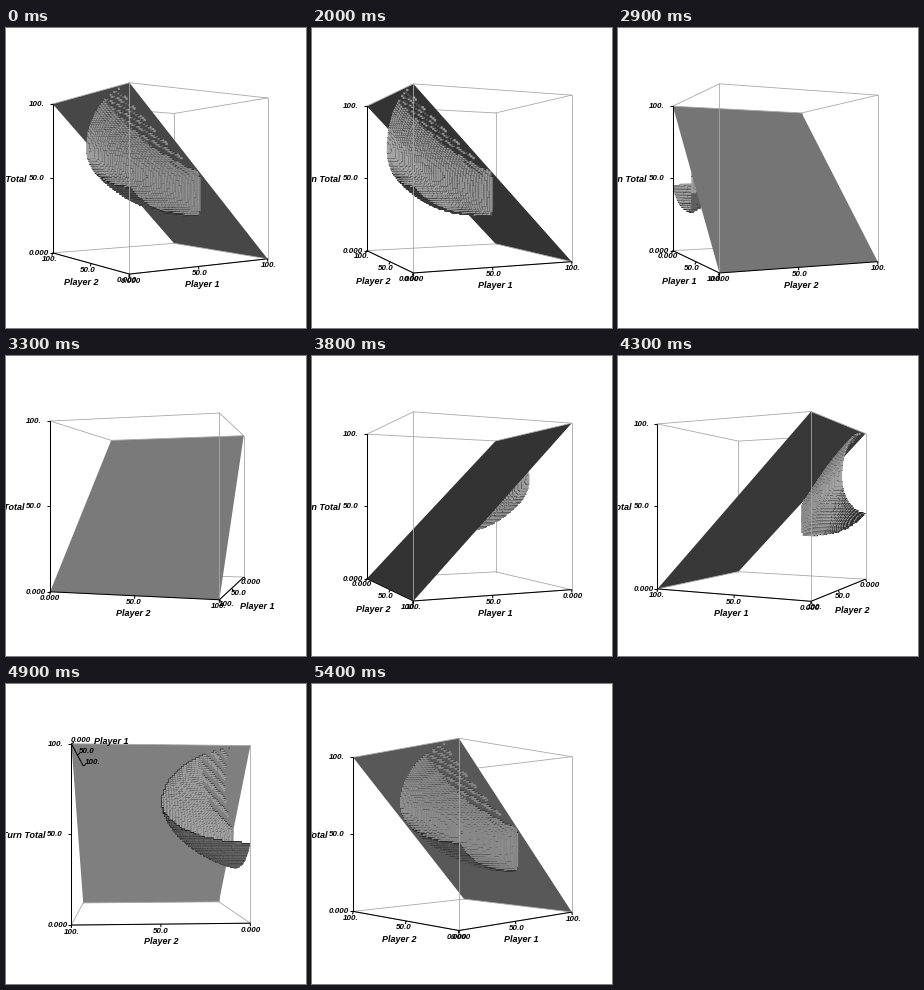
These frames come from a looping animation (300x300 px, 5.5 s). A matplotlib script:

```python
import itertools

import matplotlib.pyplot as plt
import numpy as np
from matplotlib.animation import FuncAnimation
from matplotlib.collections import LineCollection, PolyCollection

SIZE = 300
FOCAL, DIST = 560, 3.62
START, STEP = 56.3, 10          # camera heading in degrees
FRAMES, HOLD = 55, 20
NAMES = ("Player 1", "Player 2")
TICKS = ("0.000", "50.0", "100.")
FONT = dict(family="Liberation Sans", weight="bold", style="italic", va="center")


def project(pts, phi):
    """Perspective view of the unit box; returns screen points and depth."""
    q = np.asarray(pts, float) - 0.5
    c, s = np.cos(phi), np.sin(phi)
    depth = c * q[..., 0] + s * q[..., 1]
    scale = FOCAL / (DIST + depth)
    x = 150 + scale * (s * q[..., 0] - c * q[..., 1])
    y = 150.4 - scale * q[..., 2]
    return np.stack([x, y], -1), depth


def build_boundary():
    """Unit-cell faces of the hold region below the winning plane."""
    i, j, k = np.indices((50, 54, 100))
    x, y, z = i + 0.5, j + 0.5, k + 0.5
    reach = 50 * np.clip(1 - (x / 47) ** 1.6, 1e-6, 1)
    bend = np.sqrt(np.clip(1 - (y / reach) ** 2, 0, 1))
    tip = 68 - 0.6 * x
    low = 28 + 18 * np.exp(-x / 14)
    valid = i + k <= 98
    inside = (y < reach) & valid
    inside &= (z >= tip - (tip - low) * bend)
    inside &= (z <= tip + (100 - x - tip) * bend)

    quads, normals, lower = [], [], []
    for a in range(3):
        n = inside.shape[a]
        first, second = range(n - 1), range(1, n)
        here, there = inside.take(first, a), inside.take(second, a)
        edge = (here != there) & valid.take(first, a) & valid.take(second, a)
        cell = np.argwhere(edge)
        sign = np.where(here[edge], 1.0, -1.0)
        is_low = cell[:, 2] < 68 - 0.6 * cell[:, 0]

        # close to the plane only broken rows stay visible
        margin = 100 - cell[:, 0] - cell[:, 2]
        row = (cell[:, 0] + cell[:, 1]) % 5
        keep = is_low | (margin > 6) | (row < 2)
        cell, sign, is_low = cell[keep], sign[keep], is_low[keep]

        base = cell.astype(float)
        base[:, a] += 1
        u, v = np.delete(np.eye(3), a, 0)
        quads.append(np.stack([base, base + u, base + u + v, base + v], 1) / 100)
        normals.append(sign[:, None] * np.eye(3)[a])
        lower.append(is_low)
    return np.concatenate(quads), np.concatenate(normals), np.concatenate(lower)


QUADS, NORMALS, LOWER = build_boundary()
CENTERS = QUADS.mean(1)
PLANE = np.array([(0, 0, 1), (0, 1, 1), (1, 1, 0), (1, 0, 0)])
CORNERS = list(itertools.product((0, 1), repeat=3))
EDGES = [(p, q) for p, q in itertools.combinations(CORNERS, 2)
         if sum(abs(a - b) for a, b in zip(p, q)) == 1]

fig = plt.figure(figsize=(3, 3), dpi=100, facecolor="white")
ax = fig.add_axes([0, 0, 1, 1])
ax.set_xlim(0, SIZE)
ax.set_ylim(SIZE, 0)
ax.axis("off")

plane = plt.Polygon(np.zeros((4, 2)), closed=True, lw=0, zorder=3)
ax.add_patch(plane)
bowl = PolyCollection([], linewidths=0.3)
ax.add_collection(bowl)
box = [ax.plot([], [], color="#a8a8a8", lw=0.6)[0] for _ in EDGES]
rules = LineCollection([], colors="black", linewidths=0.75, zorder=6)
ax.add_collection(rules)


def make_text(size, ha="center"):
    return ax.text(0, 0, "", fontsize=size, ha=ha, zorder=7, **FONT)


marks = [[make_text(5.8, "left" if a == 2 else "center") for _ in TICKS]
         for a in range(3)]
titles = [make_text(6.5, "right" if a == 2 else "center") for a in range(3)]
titles[2].set_text("Turn Total")
for a in range(3):
    for mark, label in zip(marks[a], TICKS):
        mark.set_text(label)
for a in range(2):
    titles[a].set_text(NAMES[a])


def flip(corner, axis):
    return tuple(1 - c if a == axis else c for a, c in enumerate(corner))


def pick_axes(phi):
    """Outer edges for the three axes: (axis, corner, corner)."""
    pts, depth = project(CORNERS, phi)
    pos = dict(zip(CORNERS, pts))
    far = dict(zip(CORNERS, depth))
    floor = [c for c in CORNERS if c[2] == 0]
    left = min(floor, key=lambda c: pos[c][0] ** 2 + (SIZE - pos[c][1]) ** 2)

    def slope(axis):
        dx, dy = pos[flip(left, axis)] - pos[left]
        return -dy / dx if dx > 0 else np.inf

    main = min((0, 1), key=slope)
    other = 1 - main
    right = flip(left, main)
    top = flip(left, 2)
    start = right if far[flip(right, other)] < far[flip(left, other)] else top
    return pos, [(main, left, right), (other, start, flip(start, other)),
                 (2, left, top)]


def draw_axes(phi):
    pos, axes = pick_axes(phi)
    lines = []
    for axis, a, b in axes:
        d = pos[b] - pos[a]
        n = np.array([d[1], -d[0]]) / np.hypot(*d)
        if axis == 2:
            n = np.array([-1.0, 0.0])
        elif a[2] == 0 and n[1] < 0:
            n = -n
        p0, p1 = (pos[a], pos[b]) if a[axis] == 0 else (pos[b], pos[a])
        lines.append([p0, p1])
        for t, mark in zip((0, 0.5, 1), marks[axis]):
            p = p0 + t * (p1 - p0)
            lines.append([p, p + 3 * n])
            shift = (-24, 0.5) if axis == 2 else (11 * n[0], 7 * n[1])
            mark.set_position(p + shift)
        if axis == 2:
            shift = (-26, 0.8)
        else:
            shift = (38 * n[0], n[1] * (17 + 12 * abs(n[0])))
        titles[axis].set_position((p0 + p1) / 2 + shift)
    rules.set_segments(lines)


def draw_bowl(phi):
    cam = np.array([0.5 - DIST * np.cos(phi), 0.5 - DIST * np.sin(phi), 0.5])
    ray = cam - CENTERS
    dist = np.linalg.norm(ray, axis=1)
    facing = (NORMALS * ray).sum(1) / dist
    tone = 25 + 140 * np.abs(facing) ** 0.6
    shaded = LOWER & (facing > 0) & (NORMALS[:, 1] == 0)
    tone = np.where(shaded, 0.6 * tone, tone) / 255
    order = np.argsort(-dist)
    verts, _ = project(QUADS[order], phi)
    colors = np.repeat(tone[order, None], 3, axis=1)
    bowl.set_verts(verts)
    bowl.set_facecolor(colors)
    bowl.set_edgecolor(colors)


def update(n):
    phi = np.radians(START + STEP * max(0, n - HOLD + 1))
    below = np.cos(phi) > 0
    layer = 4 if below else 2

    plane.set_xy(project(PLANE, phi)[0])
    plane.set_facecolor([180 / 255 * abs(np.cos(phi)) / np.sqrt(2)] * 3)
    bowl.set_zorder(layer)
    draw_bowl(phi)

    for line, edge in zip(box, EDGES):
        pts, depth = project(edge, phi)
        line.set_data(pts[:, 0], pts[:, 1])
        side = sum(p[0] + p[2] - 1 for p in edge)
        if side < 0:
            line.set_zorder(layer + (-0.5 if depth.mean() > 0 else 0.5))
        elif side > 0:
            line.set_zorder(1 if below else 5)
        else:
            line.set_zorder(4.8)
    draw_axes(phi)
    return []


anim = FuncAnimation(fig, update, frames=FRAMES, interval=100,
                     init_func=lambda: update(0), repeat=True,
                     repeat_delay=0, blit=False)
plt.show()
```
